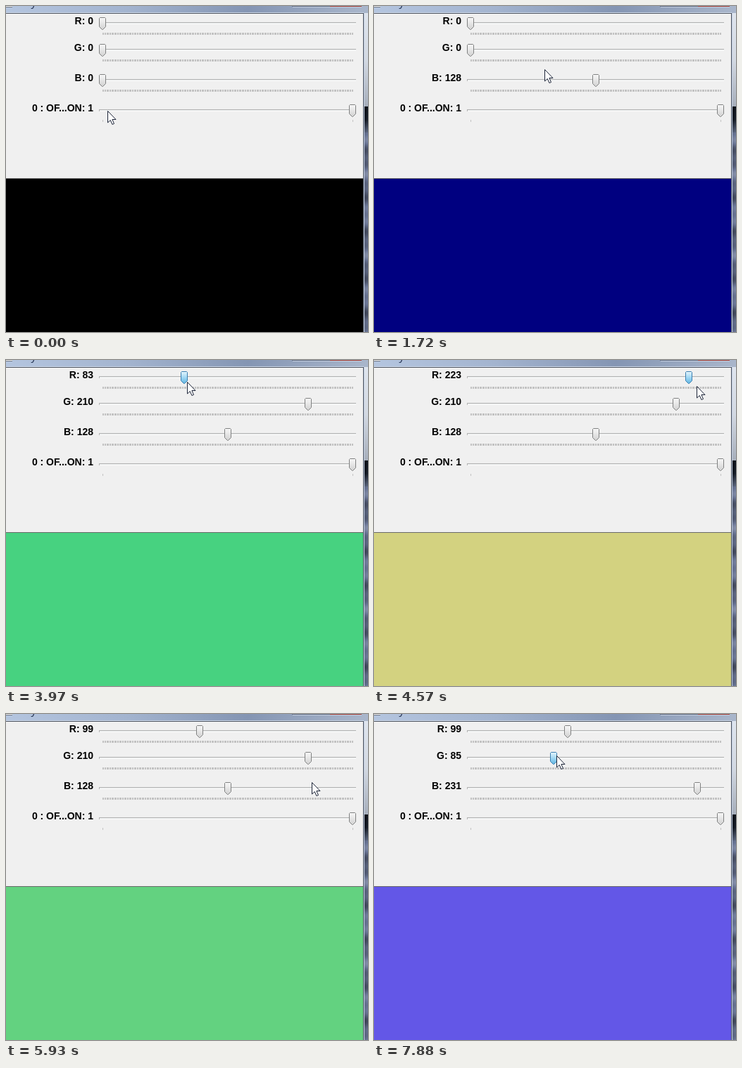
An HTML page with a canvas that plays this animation: 514 by 464 pixels, repeating every 8 s.

```html
<!DOCTYPE html>
<html lang="en">
<head>
<meta charset="utf-8">
<title>Colour mixer</title>
<style>
  html, body { margin: 0; width: 100%; height: 100%; overflow: hidden; background: #f0f0f0; }
  canvas { display: block; width: 514px; height: 464px; }
</style>
</head>
<body>
<canvas id="stage" width="514" height="464"></canvas>
<script>
const ctx = document.getElementById('stage').getContext('2d');
const LOOP = 8000;
const TRACK = { left: 132, width: 365, zero: 137, range: 355 };
const ROWS = [
  { label: 'R: ', top: 16, max: 255 },
  { label: 'G: ', top: 54, max: 255 },
  { label: 'B: ', top: 97, max: 255 },
  { label: '0 : OF...ON: ', top: 140, max: 1 }
];

const lerp = (a, b, p) => a + (b - a) * p;
const thumbX = (value, max) => TRACK.zero + Math.round(value / max * TRACK.range);

// Each pose also names the row held on the way to it.
const poses = [{ at: 0, x: 145, y: 150, values: [0, 0, 0, 1] }];

function move(at, x, y, row, value) {
  const values = [...poses.at(-1).values];
  if (value !== undefined) values[row] = value;
  poses.push({ at, x, y, row, values });
}

// Glide to a thumb, hover until the drag starts, then pull it to a new value.
function drag(row, from, to, value, slip = 3, drop = 12) {
  const { at, values } = poses.at(-1);
  const { top, max } = ROWS[row];
  const grip = thumbX(values[row], max) + 2;
  move(Math.min(from, at + 360), grip, top + 12);
  move(from, grip, top + 12, row);
  move(to, thumbX(value, max) + slip, top + drop, row, value);
}

drag(2, 720, 1570, 128);
drag(1, 2170, 3310, 210);
drag(0, 3614, 4570, 223, 12, 22);
drag(0, 5030, 5630, 99);
move(5930, 435, 98);
drag(2, 6230, 6980, 231);
drag(1, 7280, 7750, 85, 5, 6);

// The screen refreshes in discrete steps.
const run = (from, to, gap = 150) =>
  Array.from({ length: (to - from) / gap + 1 }, (_, i) => from + i * gap);
const STEPS = [...run(0, 360, 120), ...run(670, 4720), ...run(5030, 7880)];

function stateAt(time) {
  const i = poses.findIndex(pose => pose.at >= time);
  const b = poses.at(i);
  const a = i > 0 ? poses[i - 1] : b;
  const p = a === b ? 0 : (time - a.at) / (b.at - a.at);
  const mid = (from, to) => Math.round(lerp(from, to, p));
  return {
    x: mid(a.x, b.x),
    y: mid(a.y, b.y),
    row: b.row,
    values: a.values.map((value, k) => mid(value, b.values[k]))
  };
}

function box(color, x, y, w, h) {
  ctx.fillStyle = color;
  ctx.fillRect(x, y, w, h);
}

function gradient(x0, y0, x1, y1, ...colors) {
  const g = ctx.createLinearGradient(x0, y0, x1, y1);
  colors.forEach((color, i) => g.addColorStop(i / (colors.length - 1), color));
  return g;
}

function shape(points, fill, stroke) {
  ctx.beginPath();
  points.forEach(([x, y]) => ctx.lineTo(x, y));
  ctx.closePath();
  ctx.fillStyle = fill;
  ctx.fill();
  ctx.strokeStyle = stroke;
  ctx.stroke();
}

function drawTitleBar() {
  box(gradient(0, 0, 514, 0, '#b4c5df', '#a3b4cf', '#8495b3', '#a9b6cb'), 0, 0, 514, 10);
  box('#f8f8f8', 0, 0, 9, 1);
  box('#6d7480', 0, 1, 9, 1);
  ctx.font = '15px "Open Sans", sans-serif';
  ctx.textAlign = 'right';
  ctx.fillStyle = '#1b2a4a';
  ctx.fillText('ay', 43, 0);
  box('#5c687f', 406, 0, 54, 1);
  box('#9c3a32', 460, 0, 45, 1);
  box('#c3cedf', 407, 1, 98, 1);
  box('#d3deee', 0, 9, 508, 1);
}

function drawFrameEdge() {
  box(gradient(0, 10, 0, 145, '#dfe5ee', '#d3d9e2', '#a5adba'), 508, 10, 6, 135);
  box(gradient(0, 143, 0, 180, '#0c1118', '#141a24', '#59647c'), 508, 143, 6, 37);
  // Blurred desktop behind the glass.
  for (let y = 180; y < 464; y++) {
    const light = 44 + 9 * Math.sin(y / 9) + 5 * Math.sin(y / 3.7);
    box(`hsl(224 17% ${light}%)`, 508, y, 6, 1);
  }
  box('#c3cfe2', 508, 10, 1, 454);
  box('#4b525e', 507, 10, 1, 454);
  box('#4b525e', 0, 10, 508, 1);
}

function drawThumb(value, { top, max }, hot) {
  const x = thumbX(value, max);
  const [left, right, y] = [x - 4.5, x + 4.5, top + .5];
  const fill = hot
    ? gradient(0, y, 0, y + 17, '#e4f4fc', '#b8e2f7', '#8accee', '#62b4de')
    : gradient(0, y, 0, y + 17, '#f6f6f6', '#ececec', '#dedede', '#d2d2d2');
  shape([[left + 1, y], [right - 1, y], [right, y + 1], [right, y + 13], [x + .5, y + 17],
    [x - .5, y + 17], [left, y + 13], [left, y + 1]], fill, hot ? '#3c7fb1' : '#808181');
}

function drawRow(row, value, hot) {
  const { label, top, max } = row;
  ctx.font = 'bold 14px "Liberation Sans", Arial, sans-serif';
  ctx.textAlign = 'right';
  ctx.fillStyle = '#000';
  ctx.fillText(label + value, 124, top + 10);

  const { left, width } = TRACK;
  ['#b4b4b4', '#e7eaea', '#fcfcfc'].forEach((color, i) => box(color, left, top + 7 + i, width, 1));
  box('#b4b4b4', left, top + 7, 1, 3);
  for (let v = 0; v <= max; v++) box('#c2c2c2', thumbX(v, max), top + 22, 1, 3);
  drawThumb(value, row, hot);
}

function drawPointer(x, y) {
  const outline = [[0, 0], [0, 16.5], [3.8, 13], [6.4, 19], [9, 18], [6.4, 12], [11.5, 12]];
  shape(outline.map(([dx, dy]) => [x + dx - .5, y + dy - .5]), '#fff', '#1c2438');
}

function draw(step) {
  const state = stateAt(STEPS[step]);
  const before = stateAt(STEPS[Math.max(0, step - 1)]);
  // The mixed colour trails slightly behind the sliders.
  const mixed = [0, 1, 2].map(i => Math.round(lerp(state.values[i], before.values[i], .33)));

  box('#f0f0f0', 0, 0, 514, 464);
  drawTitleBar();
  drawFrameEdge();
  box(`rgb(${mixed})`, 0, 245, 507, 219);
  box('#696969', 0, 245, 507, 1);
  ROWS.forEach((row, i) => drawRow(row, state.values[i], state.row === i));
  drawPointer(state.x, state.y);
}

let shown = -1;
const start = performance.now();
function tick() {
  const time = (performance.now() - start) % LOOP;
  const step = STEPS.filter(at => at <= time).length - 1;
  if (step !== shown) draw(shown = step);
  requestAnimationFrame(tick);
}
tick();
</script>
</body>
</html>
```
